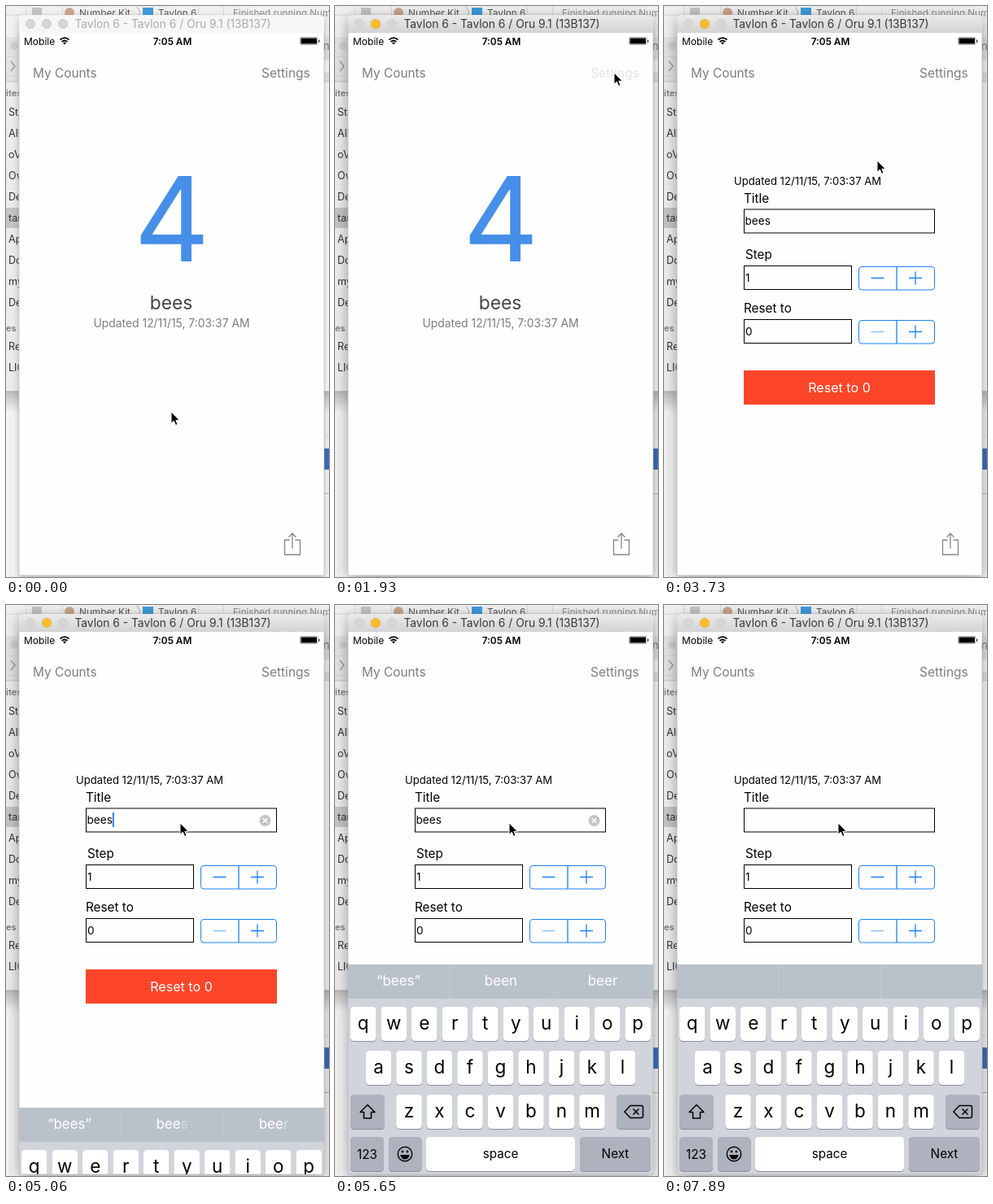
Animation of 397x702 px, one loop 8000 ms. Source, as an HTML page:

```html
<!DOCTYPE html>
<html lang="en">
<head>
<meta charset="utf-8">
<title>Counter settings</title>
<style>
html, body { margin: 0; width: 100%; height: 100%; overflow: hidden; background: #f1f1f1; }
svg { display: block; width: 397px; height: 702px; }
</style>
</head>
<body>
<svg id="stage" viewBox="0 0 397 702" font-family="Inter, 'Open Sans', sans-serif" font-size="15.3"></svg>
<script>
const stage = document.getElementById('stage');
const $ = id => document.getElementById(id);

const text = (x, y, s, size, fill = '#000', more = '') =>
  `<text x="${x}" y="${y}" font-size="${size}" fill="${fill}" ${more}>${s}</text>`;
const rect = (x, y, w, h, fill, more = '') =>
  `<rect x="${x}" y="${y}" width="${w}" height="${h}" fill="${fill}" ${more}/>`;
const line = (d, stroke, width = 1, more = '') =>
  `<path d="${d}" fill="none" stroke="${stroke}" stroke-width="${width}" ${more}/>`;
const dot = (x, y, r, fill, more = '') => `<circle cx="${x}" cy="${y}" r="${r}" fill="${fill}" ${more}/>`;
const mid = 'text-anchor="middle"';

function desktop() {
  const items = ['St', 'All', 'oVe', 'Ow', 'De', 'tam', 'Ap', 'Do', 'my', 'De'];
  return rect(0, 0, 397, 702, '#f4f4f4')
    + line('M-4 702V498Q-4 488 6 488H20M5 702V510Q6 500 16 498', '#e6e6e6')
    + rect(0, 0, 397, 40, '#f0f0f0') + rect(0, 10.5, 397, 1, '#d2d2d2')
    + rect(32, 2, 12, 9, '#c4c4c4') + line('M24.5 0V10M69.5 0V10M236.5 0V10M267.5 0V10', '#d8d8d8')
    + dot(78, 8, 6, '#c9a58b') + rect(168, 2, 13, 11, '#3f9bdc')
    + text(90, 12.5, 'Number Kit', 11.8, '#555') + line('M161 1L165 8L161 15', '#aaa')
    + text(187, 12.5, 'Tavlon 6', 11.8, '#555') + text(279, 12.5, 'Finished running Numb', 11.6, '#8a8a8a')
    + rect(0, 474, 397, 26, 'url(#drop)')
    + rect(0, 38, 397, 436, '#ececec') + rect(0, 38, 397, 55, '#e2e2e2')
    + dot(10, 49, 5, '#d0d0d0') + line('M6 68L11 74L6 80', '#999', 1.3)
    + line('M0 62.5H16M0 86.5H16', '#d4d4d4')
    + rect(0, 92.5, 397, 1, '#c4c4c4') + rect(390, 93.5, 7, 380, '#fbfbfb')
    + text(390, 54, 'n', 13, '#777') + rect(390, 67, 7, 15, '#f8f8f8')
    + rect(0, 248, 16, 25, '#c5c5c5')
    + text(0, 111, 'ites', 11, '#7c7c7c', 'font-weight="600"')
    + items.map((s, i) => text(3, 135 + 26 * i, s, 12.6, '#333')).join('')
    + text(0, 400, 'es', 11, '#7c7c7c', 'font-weight="600"')
    + text(3, 423, 'Re', 12.6, '#333') + text(3, 449, 'LIC', 12.6, '#333')
    + rect(0, 473.5, 397, 1, '#aaa')
    + rect(390, 544, 7, 26, '#3e6fbd') + rect(390, 599, 7, 1, '#b5b5b5') + rect(390, 529, 7, 1, '#dedede');
}

function chrome() {
  return `<path d="M16 700V17Q16 11 22 11H385Q391 11 391 17V700Z" fill="#fefefe" filter="url(#shade)"/>
    <path id="bar" d="M16 33V17Q16 11 22 11H385Q391 11 391 17V33Z"/>`
    + [30, 50, 70].map((x, i) => dot(x, 22, 5.7, '#d6d6d6', `id="light${i}" stroke="#c6c6c6" stroke-width=".6"`)).join('')
    + text(205, 27, 'Tavlon 6 - Tavlon 6 / Oru 9.1 (13B137)', 13.8, '#333', mid + ' id="caption"')
    + rect(16, 33, 375, 667, '#fefefe');
}

function mainScreen() {
  return text(22, 47.5, 'Mobile', 12)
    + text(204.5, 47.5, '7:05 AM', 11.8, '#000', mid + ' font-weight="600"')
    + line('M66.5 41.5Q72 36.8 77.5 41.5M68.6 44Q72 41 75.4 44', '#000', 1.7)
    + '<path d="M70 45.2Q72 43.6 74 45.2L72 47.6Z"/>'
    + rect(361.5, 38.5, 21.5, 9, 'none', 'rx="1.5" stroke="#999" stroke-width=".8"')
    + rect(362.5, 39.5, 19.5, 7, '#000') + rect(384, 41.5, 1.4, 3.5, '#444', 'rx=".7"')
    + text(33, 87.5, 'My Counts', 15.4, '#7d7d7d')
    + text(314, 87.5, 'Settings', 15.5, '#7d7d7d', 'id="settings"')
    + text(204, 314, '4', 144.5, '#468fe8', mid)
    + text(203, 373, 'bees', 22.8, '#444', mid)
    + text(203.5, 394.5, 'Updated 12/11/15, 7:03:37 AM', 13.9, '#7d7d7d', mid)
    + line('M348.5 656.5H342.5V674.5H361.5V656.5H355.5M352 667V648.5M347.5 653L352 648.5L356.5 653', '#858585', 1.3);
}

function stepper(y, minus) {
  const blue = '#1a82f7';
  return rect(239.5, y + .5, 93, 28.5, 'none', `rx="3.5" stroke="${blue}"`)
    + line(`M286 ${y}v29M301 ${y + 14.5}h16M309 ${y + 6.5}v16`, blue, 1.3)
    + line(`M254.5 ${y + 14.5}h16`, minus, 1.5);
}

function form() {
  const field = (y, w) => rect(98.5, y + .5, w, 29, '#fefefe', 'stroke="#000"');
  return rect(76, 197, 268, 338, '#fefefe')
    + text(86, 220, 'Updated 12/11/15, 7:03:37 AM', 13.1)
    + text(98, 242, 'Title', 15.3) + field(249.5, 234)
    + text(99.5, 269, '', 13.6, '#000', 'id="title"')
    + rect(100, 255, 2, 18, '#3b7de6', 'id="caret"')
    + `<g id="clear">${dot(318.5, 265, 7, '#c4c4c8')}${line('M315.8 262.3l5.4 5.4m0 -5.4l-5.4 5.4', '#fff', 1.4)}</g>`
    + text(100, 310.5, 'Step', 15.2) + field(319, 132) + text(100, 339, '1', 13.6) + stepper(320, '#1a82f7')
    + text(98, 377, 'Reset to', 15.3) + field(385, 132) + text(100, 405, '0', 13.6) + stepper(386, '#8fc1f8')
    + rect(98, 448, 235, 42, '#fc4529') + text(215.5, 475, 'Reset to 0', 16.1, '#fff', mid);
}

function keyboard() {
  const key = (x, y, w, fill = '#fff') =>
    rect(x, y + 1, w, 42, '#8b8e94', 'rx="4.5"') + rect(x, y, w, 42, fill, 'rx="4.5"');
  const row = (letters, x, y) => [...letters].map((c, i) =>
    key(x + 37.5 * i, y, 31.5) + text(x + 15.75 + 37.5 * i, y + 28, c, 22.5, '#000', mid)).join('');
  const dark = '#adb2be';
  return rect(16, 442, 375, 258, '#d1d4db') + rect(16, 442, 375, 42, '#b9c1ca')
    + line('M140.5 442v42M266.5 442v42', '#cbc6c9') + '<g id="hints"></g>'
    + row('qwertyuiop', 19, 494) + row('asdfghjkl', 37.75, 548) + row('zxcvbnm', 75.25, 602)
    + key(19, 602, 42, dark) + key(346, 602, 42, dark)
    + line('M40 614.5L49 623.5H44.5V631H35.5V623.5H31Z', '#000', 1.5, 'stroke-linejoin="round"')
    + line('M356 623L363 615.5H376.5Q378.5 615.5 378.5 617.5V628.5Q378.5 630.5 376.5 630.5H363ZM366.5 619.5l7 7m0 -7l-7 7', '#000', 1.5)
    + key(19, 654, 41, dark) + text(39.5, 680.5, '123', 15.3, '#000', mid)
    + key(66, 654, 40.5, dark) + dot(86, 675, 8.7, 'none', 'stroke="#000" stroke-width="1.4"')
    + dot(83, 672, 1.4, '#000') + dot(89, 672, 1.4, '#000') + '<path d="M80.3 676H91.7Q90.5 681.5 86 681.5T80.3 676Z"/>'
    + key(112, 654, 183) + text(203.5, 680, 'space', 15.2, '#000', mid)
    + key(301, 654, 87, dark) + text(344.5, 680, 'Next', 15.3, '#000', mid);
}

stage.innerHTML = `<defs>
  <linearGradient id="drop" x2="0" y2="1"><stop stop-color="#bcbcbc"/><stop offset="1" stop-color="#bcbcbc" stop-opacity="0"/></linearGradient>
  <linearGradient id="active" x2="0" y2="1"><stop stop-color="#ebebeb"/><stop offset="1" stop-color="#d3d3d3"/></linearGradient>
  <filter id="shade" x="-10%" y="-10%" width="120%" height="120%"><feDropShadow id="glow" dx="0" dy="4" flood-color="#000"/></filter>
  <clipPath id="screen"><rect x="16" y="33" width="375" height="667"/></clipPath></defs>`
  + desktop() + chrome()
  + `<g clip-path="url(#screen)">${mainScreen()}<g id="form">${form()}</g><g id="keys">${keyboard()}</g></g>`
  + line('M16 33V700H391V33', '#bdbdbd', .7)
  + `<path id="cursor" d="M0 0V14.2L3.3 11.2L5.6 16.4L8 15.4L5.8 10.3H10.2Z" stroke="#fff" stroke-width="1"/>`;

// Each track is a list of [start time, ...values], held until the next entry.
const pointer = [[0, 203, 499], [150, 290, 300], [290, 331, 189], [590, 341, 140], [740, 351, 88], [890, 352, 65],
  [1030, 343, 82], [3730, 262, 190], [3880, 222, 250], [4030, 205, 275], [4320, 209, 272], [4470, 214, 268]];
const press = [[0, 1], [1930, .2], [2080, .55], [2230, .9], [2380, 1]];
const titles = [[0, 'bees'], [6250, 'bee'], [6540, 'be'], [6840, 'b'], [7140, '']];
const carets = [[0, 0], [5060, 1], [5500, .5], [5650, 0], [6100, 1], [7740, .5], [7890, 0]];
const hints = [[0, '“bees” bees beer', 1, .4], [5360, '“bees” been beer', 1, 1], [6250, '“bee” been beer', 1, 1],
  [6540, '“be” been because', 1, 1], [6840, '“b” by but', 1, 1], [7140, '“b” by but', .25, 1], [7290, '', 1, 1]];
const ticks = [[0], [1930], [2080], [2230], [2380], [2530], [5060], [5210], [5360], [5500], [5650]];
const at = (track, t) => track.findLast(k => k[0] <= t);

// Share of the way still to go in a critically damped slide.
function remaining(t, start) {
  const u = Math.max(0, t - start) * .01826;
  return (1 + u) * Math.exp(-u);
}
const shift = (id, y) => $(id).setAttribute('transform', `translate(0 ${Math.round(y)})`);
const show = (id, on) => $(id).setAttribute('opacity', +on);

let shownHint;
function drawHints(hint) {
  if (hint === shownHint) return;
  shownHint = hint;
  const [, words, alpha, tail] = hint;
  $('hints').innerHTML = words.split(' ').map((w, i) => {
    const a = i ? tail : 1;
    return text([78, 204, 329][i], 468, `${w.slice(0, -1)}<tspan fill-opacity="${a}">${w.slice(-1)}</tspan>`,
      17, '#fff', `${mid} opacity="${alpha}"`);
  }).join('');
}

function draw(t) {
  const active = t >= 1930;
  $('bar').setAttribute('fill', active ? 'url(#active)' : '#f6f6f6');
  $('caption').setAttribute('fill', active ? '#383838' : '#ababab');
  $('light1').setAttribute('fill', active ? '#fdbc2e' : '#d6d6d6');
  $('light1').setAttribute('stroke', active ? '#e0a22a' : '#c6c6c6');
  $('glow').setAttribute('stdDeviation', active ? 9 : 5);
  $('glow').setAttribute('flood-opacity', active ? .36 : .25);
  show('settings', at(press, t)[1]);

  const step = at(ticks, t)[0];
  show('form', t >= 2080);
  shift('form', 667 * remaining(step, 1951));
  show('keys', t >= 5060);
  shift('keys', 258 * remaining(step, 4997));

  const title = at(titles, t)[1];
  $('title').textContent = title;
  $('caret').setAttribute('x', title ? 99.5 + $('title').getComputedTextLength() : 100);
  show('caret', at(carets, t)[1]);
  show('clear', t >= 5060 && title !== '');
  drawHints(at(hints, t));

  const [, x, y] = at(pointer, t);
  $('cursor').setAttribute('transform', `translate(${x} ${y})`);
}

const start = performance.now();
function loop() {
  draw((performance.now() - start) % 8000);
  requestAnimationFrame(loop);
}
loop();
</script>
</body>
</html>
```
